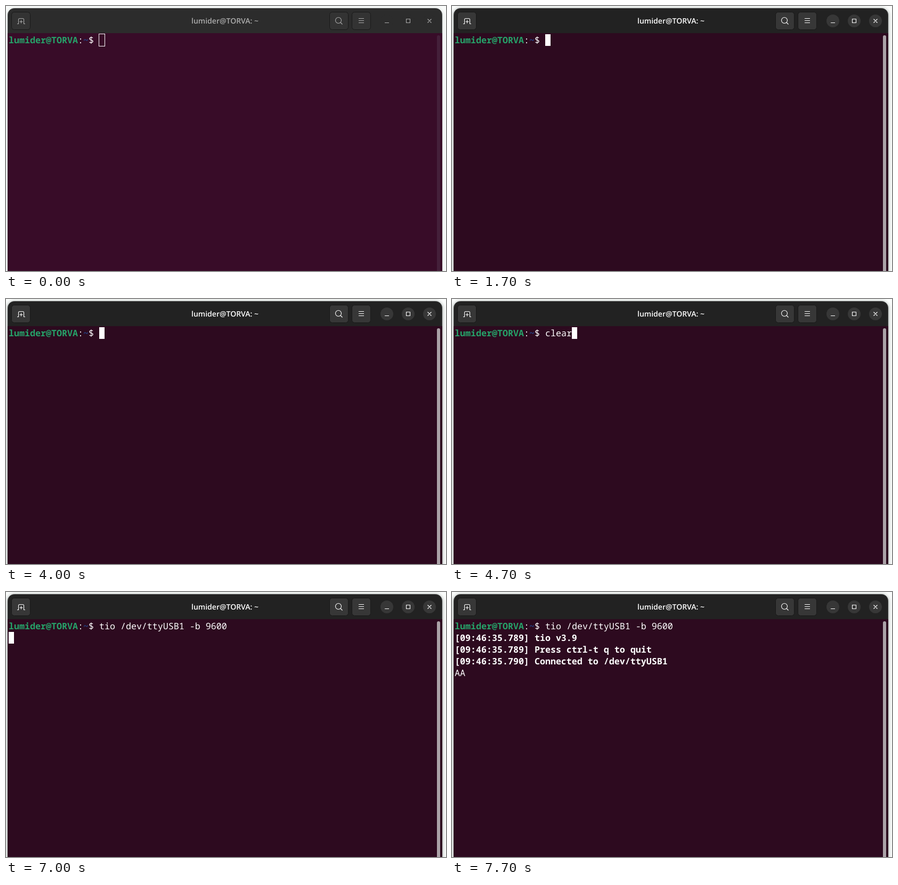
Animation of 826 by 498 pixels, one loop 8 s. Source, as an HTML page:

```html
<!DOCTYPE html>
<html lang="en">
<head>
<meta charset="utf-8">
<title>Terminal</title>
<style>
  html, body { margin: 0; width: 100%; height: 100%; overflow: hidden; background: #fafcfb; }
  svg {
    display: block; --f: 0%;
    --bar: color-mix(in srgb, #222 var(--f), #2c2c2c);
    --edge: color-mix(in srgb, #3a3a3a var(--f), #424242);
    --screen: color-mix(in srgb, #2d0a1f var(--f), #380c28);
    --ink: color-mix(in srgb, #fff var(--f), #acacac);
    --button: color-mix(in srgb, #373737 var(--f), #333);
    --disc: color-mix(in srgb, #373737 var(--f), #2c2c2c);
    --thumb: color-mix(in srgb, #aaa2a7 var(--f), #44203a);
    --shade: color-mix(in srgb, #8c9490 var(--f), #c8cfcc);
  }
  .window { fill: var(--bar); stroke: var(--edge); filter: drop-shadow(0 1px 3px var(--shade)); }
  .screen { fill: var(--screen); }
  .thumb { fill: var(--thumb); }
  .buttons { fill: var(--button); stroke: #191919; }
  .discs { fill: var(--disc); }
  .icons { fill: none; stroke: var(--ink); stroke-width: 1.1; }
  text { white-space: pre; text-rendering: geometricPrecision; }
  .title { font: 600 14px "Open Sans", "Noto Sans", sans-serif; fill: var(--ink); text-anchor: middle; }
  .line { font: 16.6667px "Noto Sans Mono", "DejaVu Sans Mono", monospace; fill: #fff; }
  .bold { font-weight: 700; }
  .user { fill: #26a269; }
  .path { fill: #24468c; }
</style>
</head>
<body>
<svg id="stage" width="826" height="498" viewBox="0 0 826 498">
  <rect class="window" x="3.5" y="4.5" width="815" height="520" rx="12"/>
  <rect class="screen" x="3" y="51" width="816" height="447"/>
  <rect class="thumb" x="809" y="55" width="6" height="460" rx="3"/>
  <g class="buttons">
    <rect x="10.5" y="11.5" width="35" height="33" rx="5"/>
    <rect x="607.5" y="11.5" width="35" height="33" rx="5"/>
    <rect x="649.5" y="11.5" width="35" height="33" rx="5"/>
  </g>
  <g class="discs">
    <circle cx="715" cy="28" r="12"/>
    <circle cx="755" cy="28" r="12"/>
    <circle cx="795" cy="28" r="12"/>
  </g>
  <g class="icons">
    <path d="M21 33.5h2.5v-8q0-2 2-2h6q2 0 2 2v8h2.5M25.5 29.5h6M28.5 26.5v6"/>
    <circle cx="624" cy="27" r="5.5"/>
    <path d="M628 31l3.5 3.5M662 23.5h10M662 27.5h10M662 31.5h10"/>
    <path d="M711 31.5h8M751.5 24.5h7v7h-7zM791.5 24.5l7 7M798.5 24.5l-7 7"/>
  </g>
  <text class="title" x="411" y="33">lumider@TORVA: ~</text>
  <text class="line" x="5" y="70"><tspan class="bold user">lumider@TORVA</tspan>:<tspan class="bold path">~</tspan>$ <tspan id="command"></tspan></text>
  <g id="log">
    <text class="line bold" x="5" y="92">[09:46:35.789] tio v3.9</text>
    <text class="line bold" x="5" y="114">[09:46:35.789] Press ctrl-t q to quit</text>
    <text class="line bold" x="5" y="136">[09:46:35.790] Connected to /dev/ttyUSB1</text>
  </g>
  <text id="reply" class="line" x="5" y="158">AA</text>
  <rect id="hollow" x="174.5" y="52.5" width="11" height="23" fill="none" stroke="#fff"/>
  <rect id="cursor" width="10" height="22" fill="#fff"/>
</svg>
<script>
  const LOOP = 8000, BLINK = 600;
  const el = id => document.getElementById(id);
  const [stage, command, log, reply, hollow, cursor] =
    ["stage", "command", "log", "reply", "hollow", "cursor"].map(el);
  const show = (node, on) => node.setAttribute("visibility", on ? "visible" : "hidden");

  // Each wake-up restarts the cursor blink; history text follows a moment later.
  const wakes = [500, 4000, 4700, 7000];
  const history = [[0, ""], [4100, "clear"], [4800, "tio /dev/ttyUSB1 -b 9600"]];

  function draw(t) {
    stage.style.setProperty("--f", t < 500 ? "0%" : t < 600 ? "60%" : "100%");

    const text = history.findLast(([at]) => at <= t)[1];
    command.textContent = text;
    show(log, t >= 7100);
    show(reply, t >= 7700);

    const wake = wakes.findLast(at => at <= t);
    const phase = Math.floor((t - (wake === 500 ? 500 : wake)) / BLINK);
    show(hollow, t < 500);
    show(cursor, t >= 500 && phase % 2 === 0);
    const row = t < 7000 ? 0 : t < 7100 ? 1 : 4;
    cursor.setAttribute("x", row ? 5 : 175 + text.length * 10);
    cursor.setAttribute("y", 53 + row * 22);
  }

  const start = performance.now();
  function tick() {
    draw((performance.now() - start) % LOOP);
    requestAnimationFrame(tick);
  }
  tick();
</script>
</body>
</html>
```
